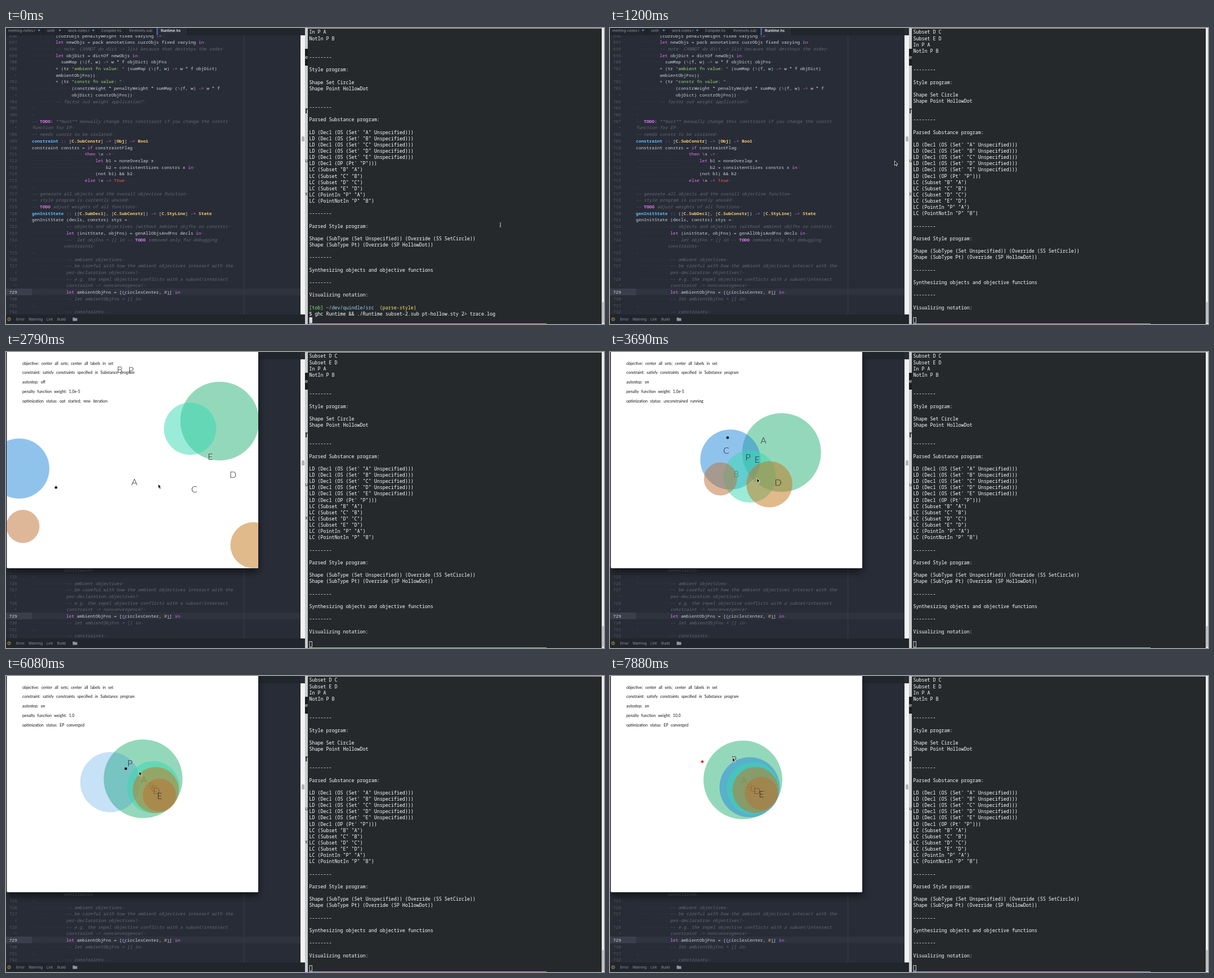
These frames come from a looping animation (1062 px wide and 527 px high, 8000 ms). An HTML page:

```html
<!DOCTYPE html>
<html lang="en">
<head>
<meta charset="utf-8">
<title>Set diagram optimiser</title>
<style>
  html, body { margin: 0; width: 100%; height: 100%; overflow: hidden; background: #282c34; }
  svg { display: block; width: 100vw; height: 100vh; }
  text { white-space: pre; }
  .code { font: 500 7.83px "Noto Sans Mono", monospace; fill: #ccd2dc; }
  .term { font: 500 8.35px "Noto Sans Mono", monospace; fill: #fff; }
  .ui { font: 6.4px Inter, sans-serif; fill: #8f96a3; }
  .active { font-weight: 600; fill: #f0f2f5; }
  .info { font: 6.9px Lato, sans-serif; fill: #111; word-spacing: 2.6px; }
  .label { font: 300 16px Lato, sans-serif; fill: #222; text-anchor: middle; }
  .edge { font: 9px Inter, sans-serif; fill: #333; }
  .comment { fill: #626977; font-style: italic; font-weight: 400; }
  .todo { fill: #e07cf5; font-weight: bold; }
  .keyword { fill: #e07cf5; }
  .string { fill: #a0da7e; }
  .number { fill: #e8a866; }
  .truth { fill: #ff5c57; }
  .name { fill: #63bbff; font-weight: bold; }
  .type { fill: #f8ca74; font-weight: 600; }
  .faint { fill: #434954; font-weight: 400; }
  .gutter { fill: #515865; font-weight: 400; }
  .current { fill: #d5dae2; }
</style>
</head>
<body>
<svg viewBox="0 0 1062 527" preserveAspectRatio="none">
  <defs>
    <clipPath id="pane"><rect y="13" width="523" height="497"/></clipPath>
    <clipPath id="sheet"><path d="M1.5 0H448V383a2 2 0 0 1-2 2H3.5a2 2 0 0 1-2-2z"/></clipPath>
    <filter id="shadow" x="-10%" y="-10%" width="120%" height="125%">
      <feDropShadow dx="0" dy="6" stdDeviation="7" flood-color="#000" flood-opacity=".6"/>
    </filter>
  </defs>

  <rect width="523" height="527" fill="#282c36"/>
  <rect y="464" width="523" height="11.7" fill="#2e333e"/>
  <rect y="464" width="46" height="11.7" fill="#3a404b"/>
  <path d="M422.5 13V510" stroke="#383d48"/>
  <g id="code" class="code" clip-path="url(#pane)"></g>
  <path d="M208 474.5h4M287 474.5h4" stroke="#568af2"/>

  <rect width="523" height="13" fill="#21252c"/>
  <rect x="268" width="54" height="13" fill="#282c36"/>
  <path d="M65.5 0V13M102.5 0V13M161.5 0V13M211.5 0V13M322.5 0V13" stroke="#1a1d23"/>
  <path d="M268.5 0V13" stroke="#568af2" stroke-width="1.5"/>
  <g id="tabs" class="ui"></g>
  <g fill="#568af2"><circle cx="58.5" cy="4" r="1.6"/><circle cx="95.5" cy="4" r="1.6"/><circle cx="155" cy="4" r="1.6"/></g>

  <rect y="510" width="531" height="17" fill="#21252c"/>
  <g id="status" class="ui"></g>
  <circle cx="5.5" cy="518.5" r="2.7" fill="none" stroke="#d8c04c" stroke-width=".8"/>
  <path d="M5.5 517v2M5.5 519.5v.6" stroke="#d8c04c" stroke-width=".8"/>
  <path d="M118.5 515.5h3l1 1h4v5h-8z" fill="#8f96a3"/>

  <rect x="523" y="13" width="8" height="497" fill="#f3f3f3"/>
  <rect x="525" y="193" width="5" height="9" rx="1.5" fill="#b5b5b5"/>
  <rect x="531" width="5" height="527" fill="#c8cacc"/>
  <rect x="531" y="37" width="5" height="30" fill="#1b1c1e"/>
  <g class="edge">
    <text x="531" y="55" style="fill:#ddd">e</text>
    <text x="531" y="152" style="font-size:15px;font-weight:700">r</text>
    <text x="531" y="239">u</text><text x="531" y="298">x</text>
  </g>

  <rect x="536" width="522" height="527" fill="#26292c"/>
  <rect x="1058" width="4" height="527" fill="#ececec"/>
  <rect x="1059" y="488" width="2" height="37" fill="#a5a8aa"/>
  <path d="M536 .5H1058" stroke="#b9bbbc"/>
  <g id="output" class="term"></g>
  <g id="prompt" class="term">
    <text x="538.5" y="500.6"><tspan fill="#86ec96">[tob]</tspan><tspan fill="#96d6f4"> ~/dev/quindle/src</tspan><tspan fill="#f8e672">  (parse-style)</tspan></text>
    <text x="538.5" y="511.7">$ ghc Runtime &amp;&amp; ./Runtime subset-2.sub pt-hollow.sty 2&gt; trace.log</text>
  </g>
  <rect id="caret" x="539" y="515.5" width="4.5" height="9.5" stroke="#dcdcdc" stroke-width=".9"/>
  <path d="M538 526.5H960" stroke="#8ccf5a"/>

  <g id="window">
    <path d="M1.5 0H448V383a2 2 0 0 1-2 2H3.5a2 2 0 0 1-2-2z" fill="#fff" filter="url(#shadow)"/>
    <g id="diagram" clip-path="url(#sheet)"><g id="info" class="info"></g></g>
  </g>

  <path id="beam" d="M-1.5-4q1.5 0 1.5 1v6q0 1-1.5 1M1.5-4q-1.5 0-1.5 1v6q0 1 1.5 1M-1 1H1" fill="none" stroke="#d0d0d0" stroke-width=".6"/>
  <path id="arrow" d="M0 0V8L1.8 6.4 3 9.2 4.4 8.6 3.2 5.8H5.6Z" fill="#000" stroke="#fff" stroke-width=".8"/>
</svg>
<script>
const $ = id => document.getElementById(id);
const make = (tag, parent, attrs = {}, text) => {
  const el = document.createElementNS('http://www.w3.org/2000/svg', tag);
  for (const key in attrs) el.setAttribute(key, attrs[key]);
  if (text !== undefined) el.textContent = text;
  return parent.appendChild(el);
};

// Editor: a leading bar marks a soft-wrapped row.
const source = String.raw`
         (currObjs penaltyWeight fixed varying ->
         let newObjs = pack annotations currObjs fixed varying in
         -- note: CANNOT do dict -> list because that destroys the order
         let objDict = dictOf newObjs in
           sumMap (\(f, w) -> w * f objDict) objFns
         + (tr "ambient fn value: " (sumMap (\(f, w) -> w * f objDict)
|         ambientObjFns))
         + (tr "constr fn value: "
               (constrWeight * penaltyWeight * sumMap (\(f, w) -> w * f
|               objDict) constrObjFns))
         -- factor out weight application?


-- TODO: **must** manually change this constraint if you change the constr
|function for EP
-- needs constr to be violated
constraint :: [C.SubConstr] -> [Obj] -> Bool
constraint constrs = if constraintFlag
                    then \x ->
                        let b1 = noneOverlap x
                            b2 = consistentSizes constrs x in
                        (not b1) && b2
                    else \x -> True

-- generate all objects and the overall objective function
-- style program is currently unused
-- TODO adjust weights of all functions
genInitState :: ([C.SubDecl], [C.SubConstr]) -> [C.StyLine] -> State
genInitState (decls, constrs) stys =
             -- objects and objectives (without ambient objfns or constrs)
             let (initState, objFns) = genAllObjsAndFns decls in
             --  let objFns = [] in -- TODO removed only for debugging
|            constraints

             -- ambient objectives
             -- be careful with how the ambient objectives interact with the
|             per-declaration objectives!
             -- e.g. the repel objective conflicts with a subset/intersect
|             constraint -> nonconvergence!
             let ambientObjFns = [(circlesCenter, 0)] in
             -- let ambientObjFns = [] in

             -- constraints`.slice(1).split('\n');

const tokens = /("[^"]*")|\b(let|in|if|then|else)\b|(->|::|\\)|\b(True)\b|\b(0)\b|(^\w+(?= ::))|(\bC\.\w+|\b(?:Obj|Bool|State)\b)|[^"\w\\:-]+|\w+|./g;
const tokenClass = ['string', 'keyword', 'keyword', 'truth', 'number', 'name', 'type'];

function drawCode() {
  let number = 695, comment = false;
  source.forEach((raw, row) => {
    const wrapped = raw[0] === '|';
    const line = wrapped ? raw.slice(1) : raw;
    const body = line.trimStart(), indent = line.length - body.length;
    const y = 16.5 + row * 11.71, x = 46 + indent * 4.7;
    if (!wrapped) { number++; comment = body.startsWith('--'); }
    make('text', $('code'), { x: wrapped ? 15 : 5.5, y, class: number === 729 ? 'current' : 'gutter' }, wrapped ? '•' : number);
    if (indent && !wrapped) make('text', $('code'), { x: 46, y, class: 'faint' }, '·'.repeat(indent));
    const text = make('text', $('code'), { x, y });
    if (comment) {
      for (const part of body.split(/(TODO:?)/))
        make('tspan', text, { class: part.startsWith('TODO') ? 'todo' : 'comment' }, part);
    } else {
      for (const m of body.matchAll(tokens)) {
        const kind = m.slice(1).findIndex(Boolean);
        make('tspan', text, kind < 0 ? {} : { class: tokenClass[kind] }, m[0]);
      }
    }
    const continues = source[row + 1] && source[row + 1][0] === '|';
    if (!continues) make('tspan', text, { class: 'faint' }, '¬');
  });
}

const setNames = ['A', 'B', 'C', 'D', 'E'];
const rule = '--------';
const output = [
  'Subset D C', 'Subset E D', 'In P A', 'NotIn P B', '', '', rule, '',
  'Style program:', '', 'Shape Set Circle', 'Shape Point HollowDot', '', '', rule, '',
  'Parsed Substance program:', '',
  ...setNames.map(n => `LD (Decl (OS (Set' "${n}" Unspecified)))`),
  `LD (Decl (OP (Pt' "P")))`,
  ...setNames.slice(1).map((n, i) => `LC (Subset "${n}" "${setNames[i]}")`),
  'LC (PointIn "P" "A")', 'LC (PointNotIn "P" "B")', '', rule, '',
  'Parsed Style program:', '',
  'Shape (SubType (Set Unspecified)) (Override (SS SetCircle))',
  'Shape (SubType Pt) (Override (SP HollowDot))', '', rule, '',
  'Synthesizing objects and objective functions', '', rule, '', 'Visualizing notation:'
];

drawCode();
output.forEach((line, i) => make('text', $('output'), { x: 538.5, y: 10.4 + i * 11.14 }, line));
[[4, 'meeting-notes.r'], [73, 'untit'], [110, 'work-notes.r'], [169, 'Compiler.hs'], [219, 'threesets.sub'], [275, 'Runtime.hs']]
  .forEach(([x, name]) => make('text', $('tabs'), { x, y: 6.5, class: x === 275 ? 'active' : '' }, name));
[[18, 'Error'], [40, 'Warning'], [72, 'Lint'], [91, 'Build']]
  .forEach(([x, name]) => make('text', $('status'), { x, y: 521.3 }, name));

const info = [0, 1, 2, 3, 4].map(i => make('text', $('info'), { x: 29, y: 22.5 + i * 16.75 }));
info[0].textContent = 'objective: center all sets; center all labels in set';
info[1].textContent = 'constraint: satisfy constraints specified in Substance program';

// Each label lies above its own circle and below the next one.
const looks = {
  A: [70, '#2bb179'], B: [53.5, '#2387d9'], C: [46.5, '#37d9b1'],
  D: [41, '#c3771b'], E: [29.5, '#bd7135'], P: [2.3, '#000']
};
const shapes = {};
for (const key in looks) {
  const [r, fill] = looks[key];
  shapes[key] = {
    circle: make('circle', $('diagram'), { r, fill, 'fill-opacity': key === 'P' ? 1 : .5 }),
    label: make('text', $('diagram'), { class: 'label' }, key)
  };
}

// Layouts: circle x, y and label x, y.
const scattered = {
  A: [379.5, 123, 228, 231], B: [23.5, 207.5, 202, 31], C: [327, 136.5, 334.5, 244],
  D: [439.5, 344, 403, 218], E: [30, 310.5, 363, 186], P: [88.8, 241.3, 222, 32]
};
const resampled = {
  A: [366, 175, 300, 130], B: [170, 190, 190, 240], C: [235, 245, 150, 150],
  D: [300, 268, 330, 260], E: [120, 240, 250, 170], P: [205, 140, 270, 220]
};
const nested = {
  A: [243.5, 183, 245, 184], B: [257.5, 193, 258, 195], C: [261.5, 198, 263, 200],
  D: [266, 203, 267, 204], E: [272.5, 212, 273, 213], P: [212.7, 165, 220, 155]
};
const settled = {
  A: [236, 185, 238, 186], B: [248, 198, 248, 197], C: [253.5, 200, 254, 200],
  D: [258.5, 203, 261, 204], E: [268.5, 209, 269, 210], P: [213, 163, 220, 148]
};

const lerp = (a, b, k) => a.map((v, i) => v + (b[i] - v) * k);
const mix = (from, to, k) => Object.fromEntries(Object.keys(from).map(n => [n, lerp(from[n], to[n], k)]));

function along(keys, t) {
  const next = keys.findIndex(k => k[0] > t);
  if (next < 0) return keys[keys.length - 1].slice(1);
  const a = keys[Math.max(next - 1, 0)], b = keys[next];
  return lerp(a, b, Math.max(0, (t - a[0]) / (b[0] - a[0]))).slice(1);
}

const mousePath = [
  [2040, 505.5, 236.5], [2490, 290, 237], [2640, 270.3, 235], [3090, 270.3, 235],
  [3390, 264.8, 235], [3540, 264.8, 235], [3990, 253, 204], [4140, 253, 204],
  [4740, 211, 167], [4890, 211, 167], [5190, 305, 173], [5640, 205, 165],
  [6080, 236.3, 169.5], [6380, 205, 165], [6530, 205, 165], [6980, 213, 163],
  [7130, 213, 163], [7580, 164, 152.5], [7730, 190, 150], [7880, 217.5, 145]
];

function mouseAt(t) {
  if (t < 150) return [878, 350.5];
  if (t < 420) return [828, 320];
  if (t < 720) return [507.5, 239.5];
  return along(mousePath, t);
}

function layoutAt(t) {
  if (t < 2940) return scattered;
  if (t < 3690) return resampled;
  if (t < 6530) return mix(resampled, nested, 1 - Math.max(0, 3990 - t) / 600);
  return mix(nested, settled, Math.min(1, (t - 6380) / 450));
}

function infoAt(t) {
  if (t < 3690) return ['off', '1.0e-5', 'opt started; new iteration'];
  if (t < 5040) return ['on', t < 3990 ? '1.0e-5' : '1.0e-4', 'unconstrained running'];
  if (t < 6530) return ['on', '1.0', 'EP converged'];
  return ['on', '10.0', t < 6830 ? 'unconstrained running' : 'EP converged'];
}

const show = (id, on) => $(id).setAttribute('visibility', on ? 'visible' : 'hidden');
// Screen updates arrive in steps of 150 ms.
const step = t => {
  if (t < 2190) return t;
  const start = t < 6080 ? 2190 : 6080;
  return start + Math.floor((t - start) / 150) * 150;
};

function render(now) {
  const t = step(now % 8000);
  const mouse = mouseAt(t);
  for (const id of ['beam', 'arrow']) $(id).setAttribute('transform', `translate(${mouse})`);
  show('beam', t < 420);
  show('arrow', t >= 420);

  const printed = t >= 870;
  $('output').setAttribute('transform', `translate(0 ${printed ? 0 : -22.28})`);
  show('prompt', !printed);
  $('caret').setAttribute('fill', t < 420 ? '#dcdcdc' : 'none');
  $('window').style.display = t < 1440 ? 'none' : '';
  $('diagram').style.display = t < 1590 ? 'none' : '';

  const layout = { ...layoutAt(t) };
  const dragB = t >= 5190 && t < 6530, dragP = t >= 7280;
  if (dragB) layout.B = [mouse[0] - 51, mouse[1] + 19.5, ...layout.B.slice(2)];
  if (dragP) layout.P = [...along(mousePath, Math.min(t, 7580)), ...layout.P.slice(2)];
  for (const key in shapes) {
    const [cx, cy, x, y] = layout[key], { circle, label } = shapes[key];
    circle.setAttribute('cx', cx);
    circle.setAttribute('cy', cy);
    label.setAttribute('x', x);
    label.setAttribute('y', y + 5.8);
  }
  shapes.B.circle.setAttribute('fill-opacity', dragB ? .25 : .5);
  shapes.P.circle.setAttribute('fill', dragP ? '#f01818' : '#000');

  const [auto, weight, status] = infoAt(t);
  info[2].textContent = `autostep: ${auto}`;
  info[3].textContent = `penalty function weight: ${weight}`;
  info[4].textContent = `optimization status: ${status}`;
}

function loop() {
  render(performance.now());
  requestAnimationFrame(loop);
}
loop();
</script>
</body>
</html>
```
